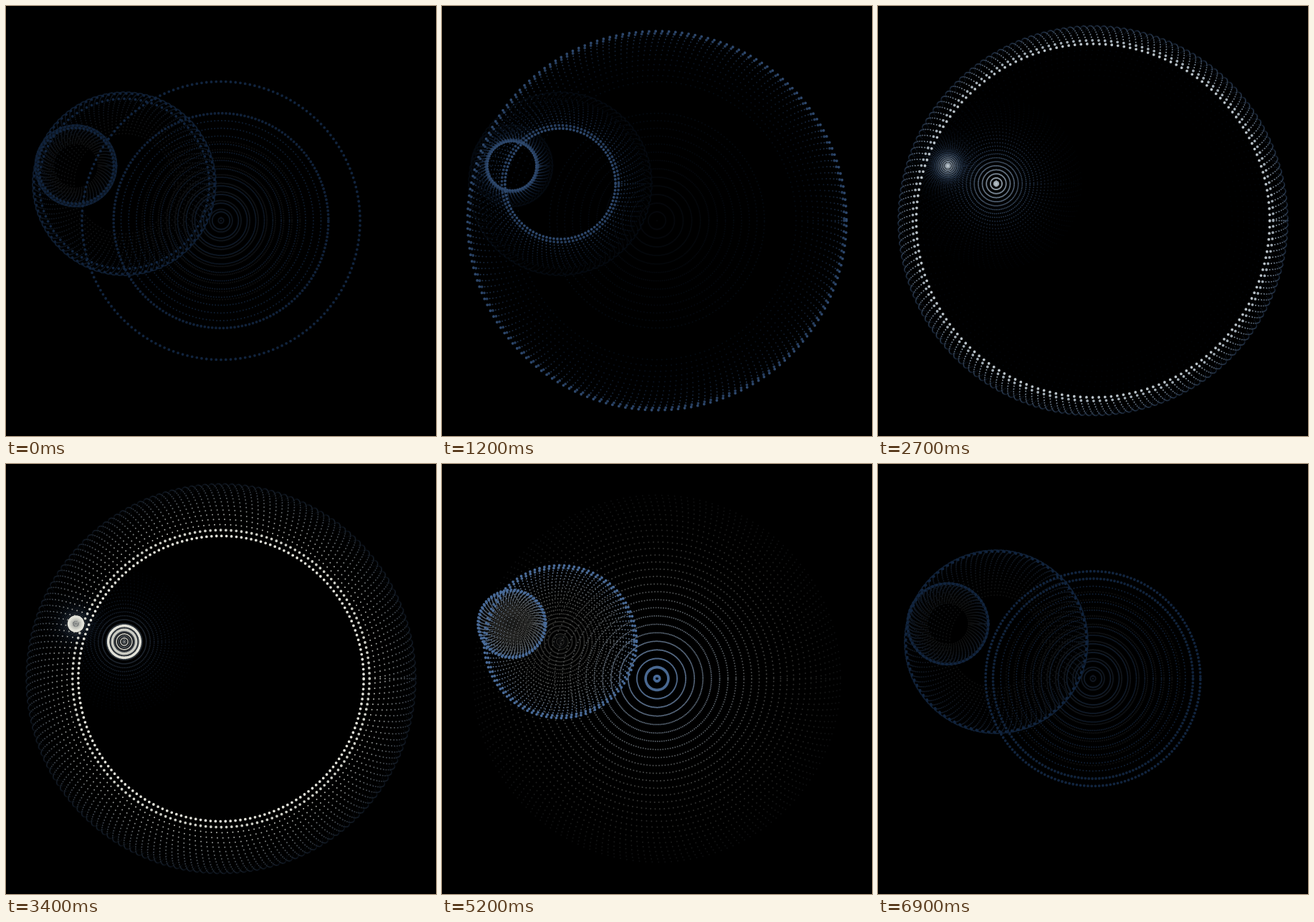
Animation, 600 px wide and 600 px high, one loop 7000 ms. Source, as an HTML page with a canvas:

```html
<!DOCTYPE html>
<html>
<head>
<meta charset="utf-8">
<title>Dotted rings</title>
<style>
  html, body { margin: 0; width: 100%; height: 100%; overflow: hidden; background: #000; }
  canvas { display: block; }
</style>
</head>
<body>
<canvas id="stage" width="600" height="600"></canvas>
<script>
const ctx = document.getElementById('stage').getContext('2d');
const TAU = 2 * Math.PI;
const LOOP = 7000, STEP = 100, FRAMES = LOOP / STEP;
const SWELL = 7000, REST = 370;   // one swell and the pause at zero, in ms
const TRAIL = 27, FADE = 0.91;
const SPIN = 0.15;                // dot spacings per step
const NAVY = [17, 36, 62], STEEL = [75, 110, 157], CREAM = [226, 226, 216];

// opens: the time at which the ring starts to grow from its centre
const rings = [
  { x: 300, y: 299.5, size: 272, dots: 180, opens: 5600 },
  { x: 165, y: 248, size: 128, dots: 96, opens: 3010 },
  { x: 97.5, y: 223, size: 57, dots: 60, opens: 3010 }
];

function radius(ring, t) {
  const period = SWELL + REST;
  const age = (t - ring.opens + period) % period;
  return age < SWELL ? ring.size * Math.sin(Math.PI * age / SWELL) : 0;
}

function mix(a, b, p) {
  return a.map((v, i) => v + (b[i] - v) * p);
}

function color(t, light) {
  const glow = (1 - Math.cos(TAU * t / LOOP)) / 2, mid = 0.55;
  const rgb = glow < mid
    ? mix(NAVY, STEEL, glow / mid)
    : mix(STEEL, CREAM, (glow - mid) / (1 - mid));
  return `rgb(${rgb.map(v => Math.round(v * light))})`;
}

function dot(ring, r, angle, size) {
  const x = ring.x + r * Math.cos(angle), y = ring.y + r * Math.sin(angle);
  ctx.moveTo(x + size / 2, y);
  ctx.arc(x, y, size / 2, 0, TAU);
}

function drawRing(ring, t, size) {
  const r = radius(ring, t);
  const turn = SPIN * t / STEP;
  ctx.beginPath();
  dot(ring, r, 0, size);
  if (r > 0.5) {
    for (let i = 0; i < ring.dots; i++) {
      dot(ring, r, (i + turn) * TAU / ring.dots, size);
    }
  }
  ctx.fill();
}

function draw(frame) {
  ctx.fillStyle = '#000';
  ctx.fillRect(0, 0, 600, 600);
  for (let age = TRAIL; age >= 0; age--) {
    const t = (frame - age + FRAMES) % FRAMES * STEP;
    ctx.fillStyle = color(t, FADE ** age);
    for (const ring of rings) drawRing(ring, t, age < 2 ? 3.8 : 2);
  }
}

let start = null, shown = -1;
function tick(now) {
  if (start === null) start = now;
  const frame = Math.floor((now - start) % LOOP / STEP);
  if (frame !== shown) draw(shown = frame);
  requestAnimationFrame(tick);
}
requestAnimationFrame(tick);
</script>
</body>
</html>
```
